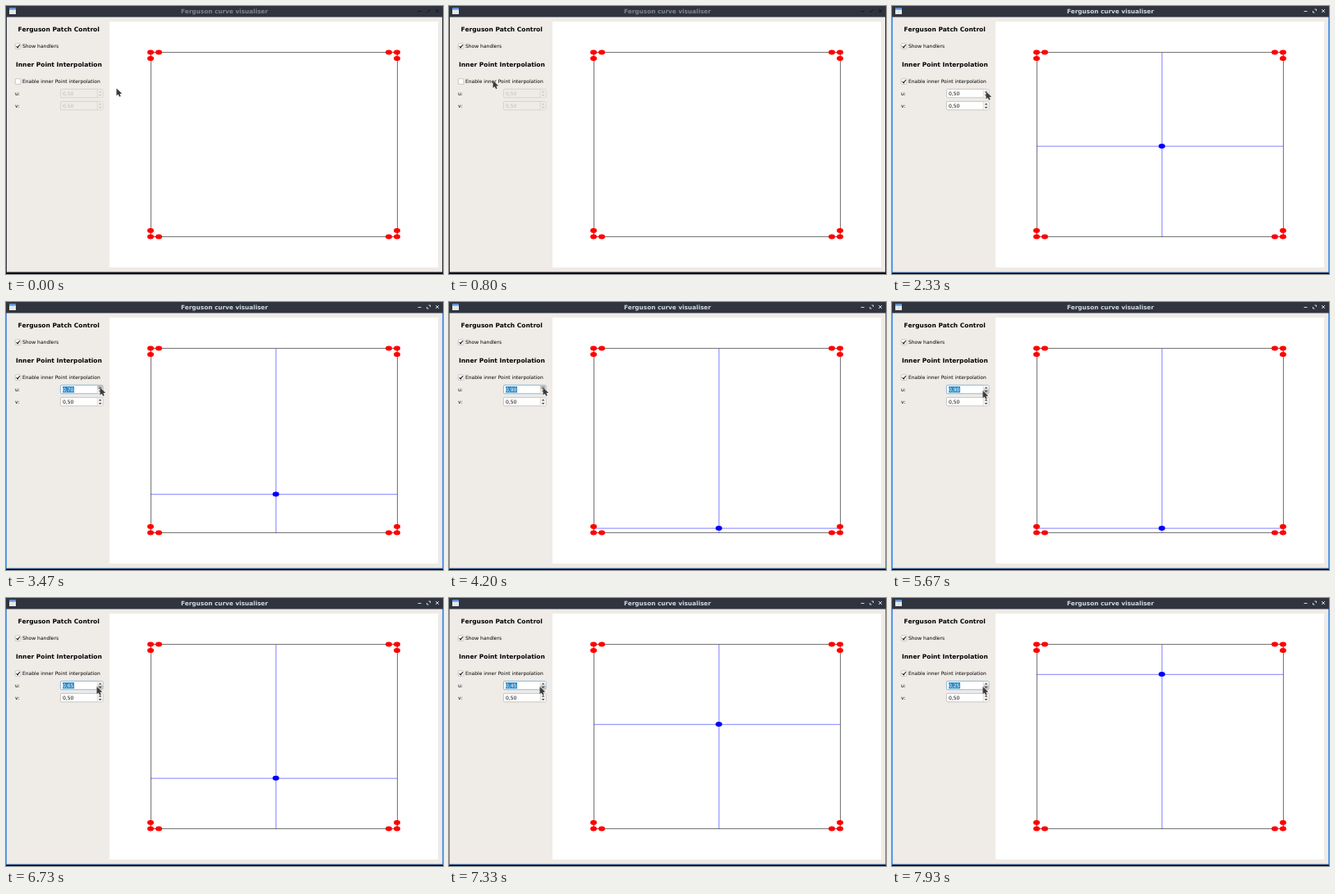
These frames come from a looping animation (532x327 px, 8000 ms). An HTML page with a canvas:

```html
<!DOCTYPE html>
<html lang="en">
<head>
<meta charset="utf-8">
<title>Ferguson curve visualiser</title>
<style>
html, body { margin: 0; width: 100%; height: 100%; overflow: hidden; background: #efebe7; }
canvas { display: block; width: 532px; height: 327px; }
</style>
</head>
<body>
<canvas id="stage" width="532" height="327"></canvas>
<script>
const ctx = document.getElementById('stage').getContext('2d');
const LOOP = 8000;
const FOCUS = 1000, ENABLE = 1070, FIRST_CLICK = 2670;
const HOLD = 70, STEP = 0.05;
const PATCH = { x: 176, y: 56.5, w: 300, h: 225, tx: 10, ty: 7.5 };

// Evenly spaced bursts of clicks on the spin box arrows.
const burst = (start, count, gap) => Array.from({ length: count }, (_, i) => start + i * gap);
const UP = [...burst(FIRST_CLICK, 2, 200), ...burst(3200, 1, 0), ...burst(3470, 7, 180)];
const DOWN = [5530, 6330, 6930, 7530].flatMap((start, i) => burst(start, i ? 4 : 3, 133));

// Pointer moves between a few resting places, sagging on the way.
const REST = { canvas: [134.5, 100.5], check: [53.5, 91], up: [114.5, 104.5], down: [110.5, 108.3] };
const MOVES = [
  { start: 70, end: 800, from: REST.canvas, to: REST.check, sag: 14 },
  { start: 1270, end: 2330, from: REST.check, to: REST.up, sag: 3 },
  { start: 4930, end: 5270, from: REST.up, to: REST.down, sag: 0 }
];

const clamp = v => Math.min(1, Math.max(0, v));
const easeOut = k => 1 - (1 - k) ** 2;

function pointerAt(t) {
  const { start, end, from, to, sag } = MOVES.findLast(m => t >= m.start) || MOVES[0];
  const k = easeOut(clamp((t - start) / (end - start)));
  return [
    from[0] + (to[0] - from[0]) * k,
    from[1] + (to[1] - from[1]) * k + sag * Math.sin(Math.PI * k)
  ];
}

// Cubic Hermite between the two ends, tangents pointing inwards.
function hermite(u, start, size, tan) {
  return start + size * u * u * (3 - 2 * u) + tan * u * (1 - u);
}

const since = (list, t) => list.filter(c => c <= t).length;
const held = (list, t) => list.some(c => t >= c && t < c + HOLD);

function rect(x, y, w, h, fill) {
  ctx.fillStyle = fill;
  ctx.fillRect(x, y, w, h);
}

function line(points, color, width) {
  ctx.beginPath();
  points.forEach(([x, y]) => ctx.lineTo(x, y));
  ctx.strokeStyle = color;
  ctx.lineWidth = width;
  ctx.stroke();
}

function box(x, y, w, h, fill, stroke, r = 1.5) {
  ctx.beginPath();
  ctx.roundRect(x, y, w, h, r);
  ctx.fillStyle = fill;
  ctx.fill();
  ctx.strokeStyle = stroke;
  ctx.lineWidth = 0.6;
  ctx.stroke();
}

// Laid out large, scaled down and barely skewed, so that hinting
// does not snap the small letters to whole pixels.
function text(str, x, y, size, color, bold = false, align = 'left') {
  ctx.save();
  ctx.transform(0.1, 0.0001, 0.0001, 0.1, x, y);
  ctx.textRendering = 'geometricPrecision';
  ctx.font = `${bold ? 'bold ' : ''}${size * 10}px "DejaVu Sans", sans-serif`;
  ctx.textAlign = align;
  ctx.fillStyle = color;
  ctx.fillText(str, 0, 0);
  ctx.restore();
}

function dot(x, y, color) {
  ctx.beginPath();
  ctx.ellipse(x, y, 4, 3, 0, 0, Math.PI * 2);
  ctx.fillStyle = color;
  ctx.fill();
}

function drawFrame(active) {
  rect(0, 0, 532, 327, '#000');
  rect(0, 0, 532, 325.5, active ? '#5294e2' : '#2f343f');
  rect(1, 13, 530, 311.5, '#efebe7');
  rect(0, 0, 532, 13.5, '#2f343f');
  rect(126, 19, 400, 300, '#fff');

  rect(4, 2, 8, 8, '#e4e6e8');
  rect(4, 2, 8, 2.5, '#5d8fcb');

  const ink = active ? '#d3dae3' : '#80858f';
  text('Ferguson curve visualiser', 266, 8.7, 7.3, ink, true, 'center');
  const sign = active ? '#d3dae3' : '#15181d';
  line([[501.5, 6.5], [505.5, 6.5]], sign, 1);
  if (active) {
    line([[514.5, 4], [516.5, 4], [516.5, 6]], sign, 1);
    line([[512.5, 6], [512.5, 8], [514.5, 8]], sign, 1);
  } else {
    line([[512.5, 8], [516.5, 4]], sign, 1);
  }
  line([[523, 4], [527, 8]], sign, 1);
  line([[527, 4], [523, 8]], sign, 1);
}

function checkbox(y, label, on) {
  box(11.3, y - 3.4, 6.6, 6.6, '#fff', '#a9a5a1', 0.8);
  if (on) line([[12.7, y], [14.2, y + 1.7], [16.7, y - 1.9]], '#111', 1.1);
  text(label, 20, y + 2.2, 6, '#000');
}

function arrow(x, y, dir, color) {
  ctx.beginPath();
  ctx.moveTo(x - 1.8, y + dir);
  ctx.lineTo(x + 1.8, y + dir);
  ctx.lineTo(x, y - dir);
  ctx.fillStyle = color;
  ctx.fill();
}

function spinBox(y, label, value, { enabled, focused, up, down }) {
  text(label, 11, y + 7.6, 6, '#000');
  const edge = focused ? '#4a90c4' : enabled ? '#aaa6a2' : '#c6c2be';
  box(66.4, y + 0.4, 51.6, 10.4, enabled ? '#fff' : '#efebe7', edge);
  rect(111.3, y + 0.8, 6.3, 9.6, enabled ? '#f4f2f0' : '#efebe7');
  if (up) rect(111.3, y + 0.8, 6.3, 4.7, '#bcb9b6');
  if (down) rect(111.3, y + 5.6, 6.3, 4.8, '#bcb9b6');
  line([[111.2, y + 0.8], [111.2, y + 10.4]], '#cfcbc7', 0.6);
  const ink = enabled ? '#444' : '#c9c5c1';
  arrow(114.6, y + 3.5, 1, ink);
  arrow(114.6, y + 8, -1, ink);
  if (focused) rect(69, y + 2, 14, 7.5, '#308cc6');
  const digits = value.toFixed(2).replace('.', ',');
  text(digits, 69, y + 7.8, 6, focused ? '#fff' : enabled ? '#000' : '#beb9b4');
}

function drawPanel(t, u) {
  const enabled = t >= ENABLE;
  text('Ferguson Patch Control', 64.2, 31.3, 7.5, '#000', true, 'center');
  checkbox(49.2, 'Show handlers', true);
  text('Inner Point Interpolation', 64.4, 74.4, 7.5, '#000', true, 'center');
  checkbox(92.2, 'Enable inner Point interpolation', enabled);
  spinBox(101, 'u:', u, {
    enabled, focused: t >= FIRST_CLICK, up: held(UP, t), down: held(DOWN, t)
  });
  spinBox(116, 'v:', 0.5, { enabled });
}

function drawPatch(t, u) {
  const { x, y, w, h, tx, ty } = PATCH;
  const px = hermite(0.5, x, w, tx), py = hermite(u, y, h, ty);

  // Half-pixel lines, kept inside one pixel row or column.
  ctx.save();
  ctx.translate(0.25, 0.25);
  ctx.strokeStyle = '#000';
  ctx.lineWidth = 0.55;
  ctx.strokeRect(x, y, w, h);
  if (t >= ENABLE) {
    line([[x, py], [x + w, py]], '#00f', 0.5);
    line([[px, y], [px, y + h]], '#00f', 0.5);
  }
  ctx.restore();

  for (const sx of [1, -1]) for (const sy of [1, -1]) {
    const cx = sx > 0 ? x : x + w, cy = sy > 0 ? y : y + h;
    const ends = [[cx + sx * tx, cy], [cx, cy], [cx, cy + sy * ty]];
    line(ends, '#f00', 0.5);
    ends.forEach(p => dot(...p, '#f00'));
  }
  if (t >= ENABLE) dot(px, py, '#00f');
}

function drawPointer(t) {
  ctx.save();
  ctx.translate(...pointerAt(t));
  ctx.beginPath();
  [[0, 0], [0, 9], [2.1, 7.3], [3.6, 10.3], [5.2, 9.6], [3.9, 6.7], [6.6, 6.3]]
    .forEach(p => ctx.lineTo(...p));
  ctx.closePath();
  ctx.strokeStyle = 'rgba(255,255,255,.5)';
  ctx.lineWidth = 0.8;
  ctx.stroke();
  ctx.fillStyle = '#3b3b3b';
  ctx.fill();
  ctx.restore();
}

function draw(t) {
  const u = 0.5 + STEP * (since(UP, t) - since(DOWN, t));
  drawFrame(t >= FOCUS);
  drawPanel(t, u);
  drawPatch(t, u);
  drawPointer(t);
}

const begin = performance.now();
function tick() {
  draw((performance.now() - begin) % LOOP);
  requestAnimationFrame(tick);
}
tick();
</script>
</body>
</html>
```
